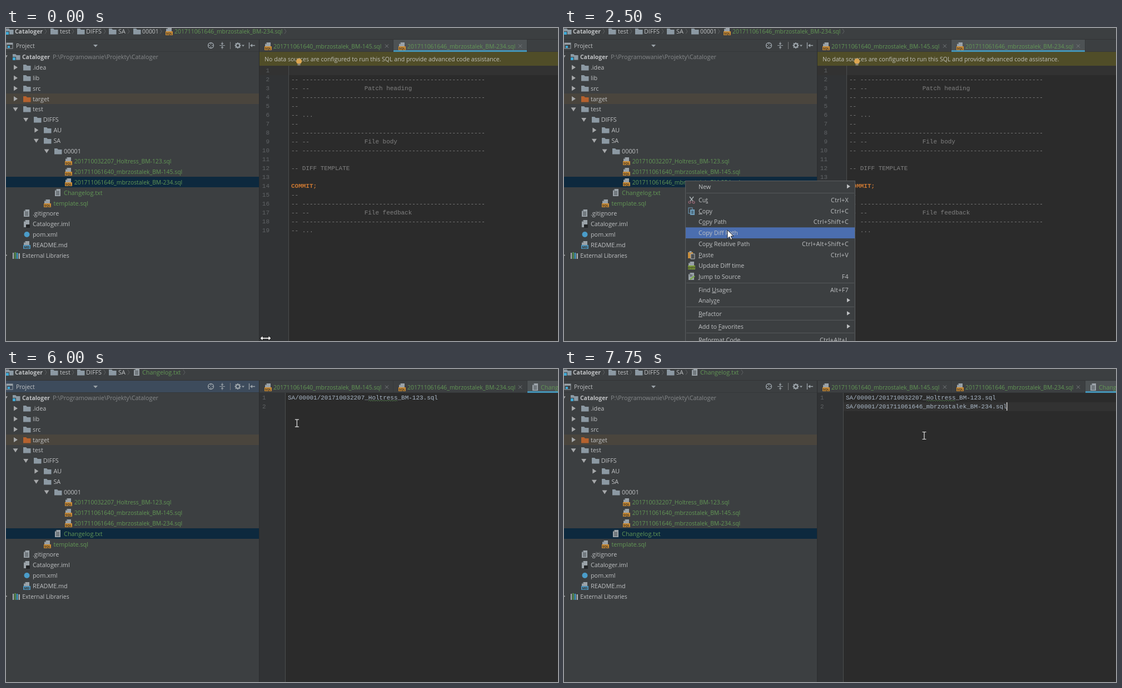
An HTML page for the animation above (8000 ms loop, 993 by 564 pixels).

```html
<!DOCTYPE html>
<html lang="en">
<head>
<meta charset="utf-8">
<title>Copy diff path</title>
<style>
html, body { margin: 0; width: 100%; height: 100%; overflow: hidden; background: #3c3f41; }
svg { display: block; }
text { font-family: "Open Sans", "Noto Sans", sans-serif; white-space: pre; }
.mono { font-family: "Liberation Mono", "Courier New", monospace; font-size: 10.97px; }
.bold { font-weight: 700; }
.keys { letter-spacing: .3px; }
.u { text-decoration: underline; }
</style>
</head>
<body>
<svg id="stage" width="993" height="564" viewBox="0 0 993 564"></svg>
<script>
const LOOP = 8000, STEP = 250;
const TEXT = '#bfc1c3', GREEN = '#629755', GREY = '#9aa2a8';
const FILES = ['201710032207_Holtress_BM-123.sql', '201711061640_mbrzostalek_BM-145.sql', '201711061646_mbrzostalek_BM-234.sql'];

// drawing helpers
const rect = (x, y, w, h, fill, more = '') => `<rect x="${x}" y="${y}" width="${w}" height="${h}" fill="${fill}" ${more}/>`;
const path = (d, fill, more = '') => `<path d="${d}" fill="${fill}" ${more}/>`;
const line = (d, color, w = 1) => path(d, 'none', `stroke="${color}" stroke-width="${w}"`);
const disc = (x, y, r, fill) => `<circle cx="${x}" cy="${y}" r="${r}" fill="${fill}"/>`;
const label = (x, y, s, fill = TEXT, size = 10.8, more = '') =>
  `<text x="${x}" y="${y}" fill="${fill}" font-size="${size}" ${more}>${s}</text>`;
const code = (x, y, s, fill = '#808080', more = 'class="mono"') => `<text x="${x}" y="${y}" fill="${fill}" ${more}>${s}</text>`;
const group = (s, id = '', at = '') => `<g ${id && `id="${id}"`} ${at && `transform="translate(${at})"`}>${s}</g>`;
const right = (x, y, r = 4.5, c = '#a6a8aa') => path(`M${x - 3} ${y - r}l${r * 1.55} ${r}l${-r * 1.55} ${r}z`, c);
const down = (x, y, c = '#a6a8aa') => path(`M${x - 4.5} ${y - 3}h9l-4.5 7z`, c);

// icons, drawn around their left edge and middle
const page = path('M4-7H11V6H1V-4z', GREY) + path('M4-7V-4H1z', '#5d6468');
const badge = (s, c) => page + rect(0, 0, 13, 7, c) + label(6.5, 5.9, s, '#3a3226', 6, 'class="bold" text-anchor="middle"');
const folder = c => path('M0-5H5L7-3H13.5V5.5H0z', c);
const ICONS = {
  folder: folder('#8c99a3'),
  target: folder('#b5622f'),
  module: folder('#8c99a3') + rect(-1, 0, 7, 7, '#3c3f41') + rect(0, 1, 5, 5, '#3fa9d6'),
  sql: badge('SQL', '#c98b35'),
  md: badge('MD', '#4a8fb8'),
  diff: badge('DIFF', '#7fa33c'),
  text: page + line('M3-2.5H9M3-.5H9M3 1.5H9M3 3.5H9', '#4a5054'),
  iml: page + rect(5, 1, 7, 6, '#232527'),
  dot: disc(6.5, 0, 5, '#4a9cc9'),
  libs: rect(0, -5, 2, 11, '#a9b0b4') + rect(3.5, -6, 2, 12, '#5ba353') + rect(7, -5, 2, 11, '#3fa9d6') + rect(10.5, -4, 2.5, 10, '#a9b0b4'),
  cut: line('M3-6L9 2M10-6L4 2', '#a9b0b4', 1.4) + line('M1 4a2 2 0 1 0 4 0a2 2 0 1 0-4 0M8 4a2 2 0 1 0 4 0a2 2 0 1 0-4 0', '#a06a78', 1.2),
  copy: rect(1, -6, 7, 10, '#3c3f41', 'stroke="#6d9cba"') + rect(4, -3, 8, 10, '#6d9cba') + line('M6 0H10M6 2H10M6 4H10', '#33434d'),
  paste: rect(0, -5, 9, 11, '#c98f3d') + rect(2.5, -7, 4, 3, GREY) + path('M5-2H12V7H5z', '#4a4d4f', 'stroke="#b0b5b8"'),
  jump: page + line('M4 5L12-1', '#7ba84f', 2.4) + line('M3-3H8M3-1H8', '#4a5054'),
  compare: page + rect(5, -2, 8, 8, '#3c3f41') + line('M12 2H7M9-1L6 2L9 5', '#4aa3cc', 1.6),
  diagram: rect(0, -6, 13, 3, GREY) + rect(0, 3, 13, 3, GREY) + line('M3-3V3M10-3V3', '#4aa3cc', 1.5),
  round: disc(6.5, 0, 6, '#b9bbbd'),
  dim: disc(6.5, 0, 6, '#66696b')
};
const icon = (name, x, y) => group(ICONS[name], '', `${Math.round(x)} ${Math.round(y)}`);

// project tree: depth, icon, name, arrow, colour, size
const TREE = [
  [0, 'module', 'Cataloger', 'v'],
  [1, 'folder', '.idea', '>'], [1, 'folder', 'lib', '>'], [1, 'folder', 'src', '>'], [1, 'target', 'target', '>'],
  [1, 'folder', 'test', 'v'], [2, 'folder', 'DIFFS', 'v'], [3, 'folder', 'AU', '>'], [3, 'folder', 'SA', 'v'], [4, 'folder', '00001', 'v'],
  ...FILES.map(f => [5, 'sql', f, '', GREEN, 10.4]),
  [4, 'text', 'Changelog.txt', '', GREEN], [3, 'sql', 'template.sql', '', GREEN],
  [1, 'text', '.gitignore'], [1, 'iml', 'Cataloger.iml'], [1, 'dot', 'pom.xml'], [1, 'md', 'README.md'],
  [0, 'libs', 'External Libraries', '>', TEXT, 10.4]
];
const rowY = i => 52.3 + 18.8 * i;

function tree() {
  return TREE.map(([d, pic, name, arrow, color, size], i) => {
    const y = rowY(i), x = 18.7 * (d - 1);
    const mark = arrow === 'v' ? down(17 + x, y) : arrow ? right(17 + x, y) : '';
    const text = i ? label(48 + x, y + 4, name, color, size) : label(29, y + 4, name, TEXT, 10.4, 'class="bold"');
    return mark + icon(pic, 31 + x, y) + text;
  }).join('') + label(84, rowY(0) + 4, 'P:\\Programowanie\\Projekty\\Cataloger', '#878a8c');
}

const chevron = x => line(`M${x - 2} 1.5l3 4.5l-3 4.5`, '#5f6264');
const crumb = (pic, ix, x, name, end, color, size) => icon(pic, ix, 6) + label(x, 10, name, color, size) + chevron(end);

function header() {
  const c = GREY;
  return rect(0, 20, 993, 1, '#323436') + rect(0, 21, 455, 21, '#3d4b5c', 'id="focus"') + rect(0, 42, 993, 1, '#35383a') +
    rect(1, 27, 11, 10, 'none', `stroke="${c}"`) + rect(1, 27, 11, 3, c) + rect(3, 32, 4, 4, '#3fa9d6') +
    label(18, 35.5, 'Project', TEXT, 10.4) + path('M157 30h8l-4 4.5z', c) +
    `<circle cx="368.5" cy="31.5" r="5" fill="none" stroke="${c}" stroke-width="1.3"/>` + line('M368.5 26v4M368.5 33v4M363 31.5h4M370 31.5h4', c) +
    line('M384 31.5h10M389 25v4M389 34v4', c) + path('M386.5 27.5h5l-2.5 3zM386.5 35.5h5l-2.5-3z', c) + rect(403, 25, 1, 13, '#777a7c') +
    `<circle cx="417" cy="31.5" r="3.4" fill="none" stroke="${c}" stroke-width="2.2"/>` +
    line('M417 26v2M417 35v2M411.5 31.5h2M420.5 31.5h2M413 27.5l2 2M421 27.5l-2 2M413 35.5l2-2M421 35.5l-2-2', c, 1.8) +
    path('M424 30.5h5l-2.5 3z', c) + line('M437.5 26v11M440 31.5h8', c, 1.3) + path('M439 31.5l4-3v6z', c);
}

const cross = x => line(`M${x - 3} 29.5l6 6M${x + 3} 29.5l-6 6`, '#777b7d');
const tab = (x, name, close, pic = 'sql') => icon(pic, x + 9, 33) + label(x + 25, 36.5, name, GREEN, pic === 'sql' ? 10.4 : 10.8) + (close ? cross(close) : '');
const active = (x, w) => rect(x, 21, w, 20, '#4d5254') + rect(x, 40, w, 3, '#4494b8');

function sqlEditor() {
  const rule = '-- ' + '-'.repeat(50), title = s => '-- --' + ' '.repeat(15) + s;
  const rows = ['', rule, title('Patch heading'), rule, '--', '-- ...', '--', rule, title('File body'), rule, '',
    '-- DIFF TEMPLATE', '', 'COMMIT;', '--', rule, title('File feedback'), rule, '-- ...'];
  return rect(456, 68, 52, 496, '#313335') + rect(456, 68, 537, 17, '#323232') + rect(508, 68, 1, 496, '#4a4d4e') +
    rows.map((s, i) => {
      const y = 80 + 16 * i, key = s === 'COMMIT;';
      return code(474, y, i + 1, '#606366', 'class="mono" text-anchor="end"') +
        (key ? code(513, y, s, '#cc7832', 'class="mono bold"') : code(513, y, s));
    }).join('') +
    rect(456, 43, 537, 25, '#504d28') +
    label(465, 60, 'No data sources are configured to run this SQL and provide advanced code assistance.', '#c0c0ba', 10.6) +
    group(disc(527, 60, 5, '#dba551') + rect(524.5, 64, 5, 3.5, '#8b8578'), 'bulb');
}

function logEditor() {
  const wave = 'M652 58' + 'l2-2l2 2'.repeat(13);
  return rect(456, 43, 537, 521, '#2b2b2b') + rect(456, 43, 46, 521, '#313335') + rect(503, 60, 490, 16, '#323232', 'id="lineBg"') +
    rect(502, 43, 1, 521, '#4a4d4e') + [1, 2].map(n => code(461, 39 + 16 * n, n, '#606366')).join('') +
    code(507, 55, 'SA/00001/' + FILES[0], '#a9b7c6') + line(wave, '#5b8a56', .8) +
    group(code(507, 71, 'SA/00001/' + FILES[2], '#a9b7c6'), 'pasted') + rect(507, 60, 1.5, 15, '#d0d0d0', 'id="caret"');
}

// menu rows: label with & before the mnemonic | shortcut, '>' for a submenu | icon | x when disabled
const ITEM = 19.75, GAP = 3.8;
const MENUS = {
  treeMenu: { x: 219, y: 276.5, w: 304, rows: ['New|>', '-', 'Cu&t|Ctrl+X|cut', '&Copy|Ctrl+C|copy', 'C&opy Path|Ctrl+Shift+C', 'Copy Diff Path',
    'Cop&y Relative Path|Ctrl+Alt+Shift+C', '&Paste|Ctrl+V|paste', 'Update Diff time||diff', '&Jump to Source|F4|jump', '-',
    'Find &Usages|Alt+F7', 'Analy&ze|>', '-', '&Refactor|>', '-', 'Add to &Favorites|>', '-', '&Reformat Code|Ctrl+Alt+L'] },
  editMenu: { x: 564, y: 74.6, w: 266, rows: ['Cop&y Reference|Ctrl+Alt+Shift+C', '&Paste|Ctrl+V|paste', 'Past&e from History...|Ctrl+Shift+V',
    'Paste S&imple|Ctrl+Alt+Shift+V', 'Column Selection &Mode|Alt+Shift+Insert', '-', '&Refactor|>', '-', 'Folding|>', 'Analy&ze|>', '-',
    'Edit as Table...', '-', 'Go To|>', 'Generate...|Alt+Insert||x', '-', 'Attach Console|||x', '-', 'Local &History|>', '&Git|>', '-',
    'Compare with Clip&board||compare', 'File Encoding', '-', 'Diagrams|>|diagram', 'Open on Repoly||dim|x', 'Create Note...||round'] }
};

function menu(id) {
  const m = MENUS[id], end = m.x + m.w, top = Math.floor(m.y) - .5;
  let y = m.y, out = '';
  m.tops = [];
  for (const row of m.rows) {
    if (row === '-') {
      out += rect(m.x + 1, Math.round(y + 1), m.w - 2, 1, '#55585a');
      y += GAP;
      continue;
    }
    const [name, keys = '', pic, off] = row.split('|');
    const mid = y + ITEM / 2, color = off ? '#75787a' : TEXT;
    m.tops.push(y);
    out += label(m.x + 23, mid + 3.9, name.replace(/&(.)/, '<tspan class="u">$1</tspan>'), color, 10.7);
    if (keys === '>') out += right(end - 11, mid - 1, 3.8, TEXT);
    else if (keys) out += label(end - 11, mid + 3.9, keys, color, 10.8, 'class="keys" text-anchor="end"');
    if (pic) out += icon(pic, m.x + 4, mid);
    y += ITEM;
  }
  return group(rect(m.x - .5, top, m.w + 1, Math.round(y - top), '#3c3f41', 'stroke="#5a5d5f"') +
    rect(m.x, 0, m.w, ITEM, '#4b6eaf', `id="${id}Hover"`) + out, id);
}

const POINTERS =
  group(path('M0 0V15.5L3.6 12L6 17.5L8.6 16.4L6.2 11H11z', '#fff', 'stroke="#111" stroke-width=".9"'), 'arrow') +
  group(path('M-10 0l5-4.5v3.2h10v-3.2l5 4.5l-5 4.5v-3.2h-10v3.2z', '#fff', 'stroke="#111" stroke-width=".9"'), 'resize') +
  group(line('M-3.5-6.5H3.5M0-6.5V6.5M-3.5 6.5H3.5', '#e4e4e4', 1.2), 'beam');

document.getElementById('stage').innerHTML =
  rect(0, 0, 993, 564, '#3c3f41') +
  icon('module', 0, 6) + label(16, 10, 'Cataloger', TEXT, 10.4, 'class="bold"') + chevron(72) +
  crumb('folder', 80, 97, 'test', 121) + crumb('folder', 128, 144, 'DIFFS', 178) + crumb('folder', 185, 202, 'SA', 221) +
  group(crumb('folder', 229, 245, '00001', 279, TEXT, 10.4) + crumb('sql', 287, 303, FILES[2], 503, GREEN, 10.4), 'sqlCrumb') +
  group(crumb('text', 229, 245, 'Changelog.txt', 321, GREEN), 'logCrumb') +
  header() + rect(0, 118, 455, 19, '#4a453d') + rect(0, 0, 455, 19, '#0d293e', 'id="selected"') + tree() +
  rect(455, 21, 1, 543, '#2b2d2e') + rect(456, 43, 537, 521, '#2b2b2b') +
  group(active(697, 240), 'sqlTab') + group(active(938, 55) + tab(937, 'Changelog.txt', 0, 'text'), 'logTab') +
  rect(696, 21, 1, 22, '#35383a') + rect(937, 21, 1, 22, '#35383a') +
  tab(456, FILES[1], 685) + tab(697, FILES[2], 925) +
  group(sqlEditor(), 'sqlEditor') + group(logEditor(), 'logEditor') +
  menu('treeMenu') + menu('editMenu') + POINTERS;

// pointer path: step, x, y
const MOVES = [[0, 467, 559], [1, 452, 522], [4, 219, 277], [5, 219, 277], [9, 294, 364], [10, 294, 364],
  [14, 134, 296], [16, 165, 292], [20, 165, 292], [25, 565, 75], [26, 565, 75], [27, 602, 112], [30, 645, 106], [31, 648, 120]];
const OPEN_TREE = 5, COPIED = 11, PICK = 16, OPEN_LOG = 17, CRUMB = 21, CLICK = 25, OPEN_EDIT = 26, PASTE = 31;

const $ = id => document.getElementById(id);
const show = (id, on) => $(id).style.display = on ? '' : 'none';

function pointer(n) {
  const i = MOVES.findIndex(m => m[0] >= n), b = MOVES[i], a = MOVES[Math.max(0, i - 1)];
  const p = b === a ? 0 : (n - a[0]) / (b[0] - a[0]), e = p * p * (3 - 2 * p);
  return [a[1] + (b[1] - a[1]) * e, a[2] + (b[2] - a[2]) * e];
}

function drawMenu(id, on, y) {
  const m = MENUS[id];
  const top = y > m.y + 2 ? m.tops.find(t => y >= t && y < t + ITEM) : undefined;
  show(id, on);
  show(id + 'Hover', top !== undefined);
  if (top !== undefined) $(id + 'Hover').setAttribute('y', top);
}

function draw(n) {
  const [x, y] = pointer(n), log = n >= OPEN_LOG, pasted = n >= PASTE;
  const inTree = n >= OPEN_TREE && n < COPIED, inEdit = n >= OPEN_EDIT && !pasted;
  const kind = n === 0 ? 'resize' : x > 456 && !inTree && !inEdit ? 'beam' : 'arrow';
  for (const id of ['arrow', 'resize', 'beam']) {
    show(id, id === kind);
    $(id).setAttribute('transform', `translate(${x} ${y})`);
  }
  show('bulb', n < COPIED);
  show('focus', n >= PICK && n < CLICK);
  $('selected').setAttribute('y', Math.floor(rowY(n >= PICK ? 13 : 12) - 9.4));
  show('sqlTab', !log);
  show('sqlEditor', !log);
  show('logTab', log);
  show('logEditor', log);
  show('sqlCrumb', n < CRUMB);
  show('logCrumb', n >= CRUMB);
  show('lineBg', n >= CLICK);
  show('pasted', pasted);
  show('caret', !inEdit && (pasted || n === CLICK || n % 4 > 1));
  $('caret').setAttribute('x', pasted ? 796 : 507);
  drawMenu('treeMenu', inTree, y);
  drawMenu('editMenu', inEdit, y);
}

let last = -1;
function frame() {
  const n = Math.floor(performance.now() % LOOP / STEP);
  if (n !== last) draw(last = n);
  requestAnimationFrame(frame);
}
frame();
</script>
</body>
</html>
```
